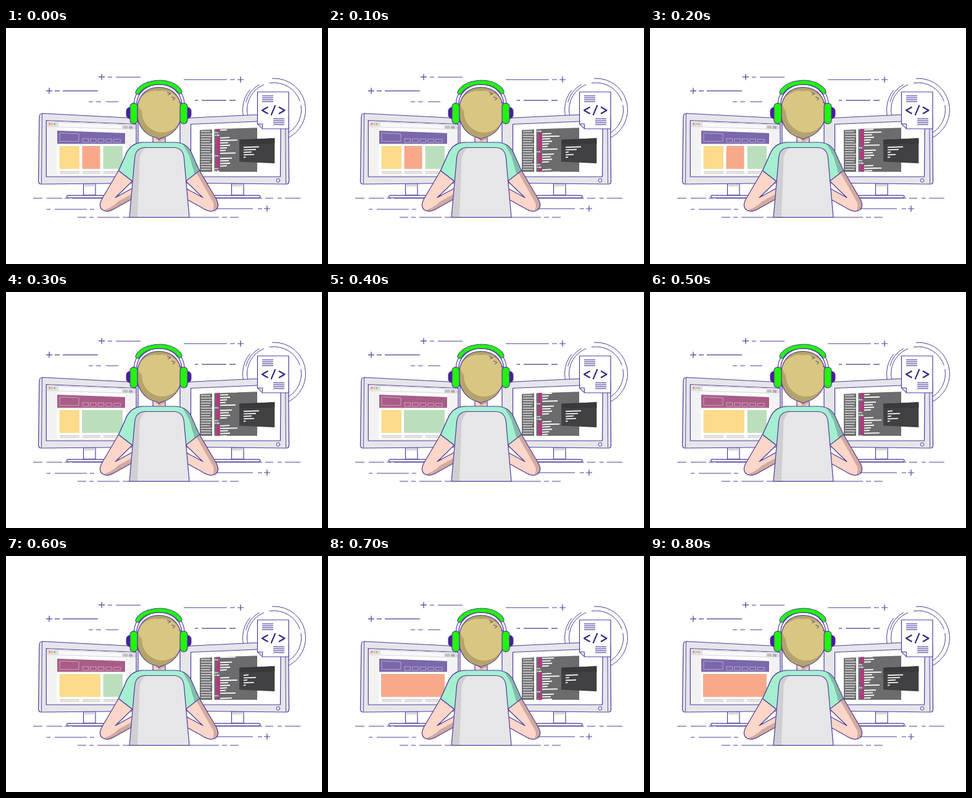
These frames come from a looping animation (512 px wide and 384 px high, 0.9 s). An HTML page with a canvas:

```html
<!DOCTYPE html>
<html lang="en">
<head>
<meta charset="utf-8">
<title>Developer at work</title>
<style>
html, body { margin: 0; width: 100%; height: 100%; overflow: hidden; background: #fff; }
canvas { display: block; width: 512px; height: 384px; }
</style>
</head>
<body>
<canvas id="stage"></canvas>
<script>
const canvas = document.getElementById('stage');
const ratio = window.devicePixelRatio || 1;
canvas.width = 512 * ratio;
canvas.height = 384 * ratio;
const ctx = canvas.getContext('2d');

const STEP = 100, STEPS = 9;
const INK = '#4d3a9c', SHELL = '#e6e6ea', SKIN = '#fcd6c8', SKIN_DARK = '#d0aaa0';
const GREEN = '#22f40b', PLUM = '#4a1c9a', PURPLE = '#7b67ab', MAGENTA = '#a85c88';
const YELLOW = '#fcdb8c', ORANGE = '#f7a98a', MINT = '#bbdfbd';

function shape(d, fill, stroke, width = 1.2) {
  const p = new Path2D(d);
  if (fill) { ctx.fillStyle = fill; ctx.fill(p); }
  if (stroke) { ctx.strokeStyle = stroke; ctx.lineWidth = width; ctx.stroke(p); }
}

function box(x, y, w, h, fill) {
  ctx.fillStyle = fill;
  ctx.fillRect(x, y, w, h);
}

function pill(x, y, w, h, r, fill, stroke, width = 1.2) {
  ctx.beginPath();
  ctx.roundRect(x, y, w, h, r);
  ctx.fillStyle = fill;
  ctx.fill();
  if (stroke) { ctx.strokeStyle = stroke; ctx.lineWidth = width; ctx.stroke(); }
}

function dot(x, y, r, fill, stroke) {
  ctx.beginPath();
  ctx.arc(x, y, r, 0, 7);
  if (fill) { ctx.fillStyle = fill; ctx.fill(); }
  if (stroke) { ctx.strokeStyle = stroke; ctx.lineWidth = 1; ctx.stroke(); }
}

function arc(x, y, r, from, to) {
  ctx.beginPath();
  ctx.arc(x, y, r, from * Math.PI / 180, to * Math.PI / 180);
  ctx.strokeStyle = INK;
  ctx.lineWidth = 1;
  ctx.stroke();
}

// Dashes on one row, given as pairs of x positions.
function dashes(y, ...xs) {
  let d = '';
  for (let i = 0; i < xs.length; i += 2) d += `M${xs[i]},${y}H${xs[i + 1]}`;
  shape(d, null, INK, 1.2);
}

function plus(x, y) {
  shape(`M${x - 5},${y}h10M${x},${y - 5}v10`, null, INK, 1.2);
}

function mirrored(draw) {
  ctx.save();
  ctx.translate(496, 0);
  ctx.scale(-1, 1);
  draw();
  ctx.restore();
}

function clipped(d, draw) {
  ctx.save();
  ctx.clip(new Path2D(d));
  draw();
  ctx.restore();
}

function backdrop() {
  plus(70, 102.3);
  dashes(102.3, 79, 87, 92, 149);
  plus(155, 79.7);
  dashes(80, 165, 172, 178, 218);
  dashes(120, 134, 141, 146, 154, 162, 182);
  dashes(84, 288, 358, 363, 371);
  plus(380, 84);
  dashes(117.6, 306, 311, 317, 357, 362, 372);
  dashes(277, 44, 59, 66, 91, 95, 102, 107, 185, 310, 415, 420, 433, 440, 447, 452, 477);
  dashes(295, 66, 72, 79, 131, 136, 143);
  dashes(294, 341, 400, 408, 415);
  plus(423, 294);
  dashes(308, 116, 130, 135, 142, 148, 184, 189, 345, 350, 358, 363, 377);
}

function badgeRings() {
  dot(434.5, 133, 44, '#fff');
  arc(434.5, 133, 51, -94, 78);
  arc(434.5, 133, 51, 150, 219);
  arc(434.5, 133, 44, -205, -112);
  arc(434.5, 133, 44, -100, -18);
  arc(434.5, 133, 44, -10, 62);
  arc(434.5, 133, 47.5, 195, 240);
}

function documentIcon() {
  shape('M407.5,104H458V164H416L407.5,156Z', '#fff', INK);
  shape('M407.5,156H415.5V164Z', '#e4e1f0', INK, 1);
  for (let i = 0; i < 4; i++) {
    dashes(110.5 + i * 3.1, 415, 433);
    dashes(147.8 + i * 3.1, 433, 451);
  }
  shape('M424.5,128.5L415,134L424.5,139.5M436.5,125.5L429.5,142M442,128.5L451.5,134L442,139.5',
    null, '#3a2580', 2.1);
}

function stand(x, baseX, baseW) {
  shape(`M${x},253h19.5v19h-19.5Z`, '#fff', INK);
  box(x + 1, 254, 18, 4, '#d9d8df');
  pill(baseX, 272.3, baseW, 4, 2, '#fff', INK);
}

function page(step) {
  const magenta = step > 2 && step < 7;
  shape('M66.5,151.5L210,157V241H66.5Z', '#f3f2f3');
  shape('M66.5,151.5L210,157V165.5L66.5,161Z', '#dfdfe2');
  shape('M85,154L188,158V163.5L85,160.5Z', '#f8f8f8');
  ['#ee6660', '#f2be4c', '#7bc96f'].forEach((c, i) => dot(71 + i * 4, 156 + i * .15, 1.5, c));
  box(190, 159.5, 7, 4, '#bdbcc0');
  box(199.5, 159.8, 5.5, 4, '#aaa9ae');
  shape('M82.5,162L194,166V239H82.5Z', '#fff');

  shape('M83,167L193,171V188.5H83Z', magenta ? MAGENTA : PURPLE);
  const line = magenta ? '#dba9c4' : '#bdb0d8';
  shape('M87,170.8L118,172V184.5H87Z', null, line, .9);
  for (let i = 0; i < 5; i++) {
    const x = 124 + i * 12.6;
    shape(`M${x},${180 + i * .25}h${i === 4 ? 11 : 9.5}V186h${i === 4 ? -11 : -9.5}Z`, null, line, .9);
  }

  const cards =
    step < 3 ? [[86.5, 32.5, YELLOW], [123.5, 29, ORANGE], [157.5, 31.5, MINT]] :
    step < 5 ? [[86.5, 32.5, YELLOW], [123, 66, MINT]] :
    step < 7 ? [[86.5, 66.5, YELLOW], [157.5, 31.5, MINT]] :
    [[86, 103, ORANGE]];
  for (const [x, w, fill] of cards) box(x, 192, w, 37.3, fill);
  for (const [x, w] of [[87, 32], [124, 29], [157.5, 31.5]]) {
    box(x, 233.5, w, 1, '#a9a8a8');
    box(x, 236.2, w, 1, '#b9b8b8');
  }
}

function leftMonitor(step) {
  stand(125.5, 98.5, 92);
  shape('M59,139L214,147V252.5L57,254Q52.5,254 52.5,249L54,145Q54,139 59,139Z', SHELL, INK);
  shape('M58.5,140L57.5,253', null, INK, .9);
  shape('M65.3,150.5L211,156.5V242H65.3Z', '#fff', INK);
  page(step);
}

// One cycle of code rows; negative widths mark short rows without a keyword.
const CODE = [15, 28, 13, 16, 11, 9, 25, -5, 19, 14, 16, 11, -5, -7];
const PITCH = 4.18;

function codeRows(step) {
  const cycle = PITCH * CODE.length;
  const offset = step / STEPS * cycle;
  for (let i = -CODE.length; i < 2 * CODE.length; i++) {
    const w = CODE[(i + CODE.length) % CODE.length];
    const y = 177 + i * PITCH - offset;
    if (y < 158 || y > 236) continue;
    if (w < 0) {
      box(338.5, y + .8, 2, 1.7, '#fff');
      box(341.5, y + .8, -w - 3, 1.7, '#fff');
    } else {
      box(341, y, 5.3, 3.5, '#c82a86');
      shape(`M347,${y + .9}l${w},-.6v1.8l${-w},.6Z`, '#fff');
    }
  }
}

const TYPED = [
  [25, 20, 13, 17, 3.5],
  [25, 18, 5, 13, 4],
  [8, 20, 6, 17, 3.5],
  [20, 6, 17, 3.5]
];
const TYPED_ORDER = [0, 1, 1, 0, 0, 2, 2, 3, 0];

function terminal(step) {
  shape('M378,181.8L435.3,179.3V220.3L378,217.5Z', '#414143');
  shape('M378,181.8L435.3,179.3V188L378,189.3Z', '#39393b');
  TYPED[TYPED_ORDER[step]].forEach((w, i) => {
    const y = 193.3 + i * 4.1;
    shape(`M385,${y}l${w},-.7v1.7l${-w},.7Z`, '#fff');
  });
}

function rightMonitor(step) {
  stand(365.5, 336.5, 75.5);
  shape('M282,147L453,139Q457.5,139 457.7,144L458.5,250Q458.5,254 454,254L282,252Z', SHELL, INK);
  shape('M452.7,140L453.5,253', null, INK, .9);
  shape('M299.5,156.5L445.3,150.5L444.5,242H299.5Z', '#fff', INK);
  dot(441, 248, 2.8, '#fff', INK);
  shape('M314,166L334,165.2V234H314Z', '#6c6c6e');
  for (let i = 0; i < 16; i++) {
    const w = 15 + i * 7 % 4;
    shape(`M315.8,${168.5 + i * 4.1}h${w}`, null, '#d6d6d8', 1.6);
  }
  const panel = 'M337.5,164.5L407,162.3V234H337.5Z';
  shape(panel, '#6c6c6e');
  clipped(panel, () => codeRows(step));
  terminal(step);
}

const ARM = 'M183,231L155,279Q149,291 157,296.5Q164,300.5 174,295L208,276V259L177,276L206,248Z';
const SLEEVE = 'M222,186Q204,187 196,202L182.5,232L205,249.5L214,230Z';

function person() {
  shape(ARM, SKIN);
  clipped(ARM, () => shape('M153,298Q170,294 182,282L208,268V300Z', SKIN_DARK));
  shape(ARM, null, INK);
  mirrored(() => {
    shape(ARM, SKIN);
    clipped(ARM, () => shape('M178,231L188,235L162,281Q156,289 163,300H145V270Z', SKIN_DARK));
    shape(ARM, null, INK);
  });

  shape('M238,172V188H258V172Z', SKIN, INK);
  shape('M238.6,174H257.4V181L248,185Z', SKIN_DARK);
  const shirt = 'M222,186H274Q293,187 300,202L313.5,232L291,249.5L284,230H212L205,249.5L182.5,232L196,202Q203,187 222,186Z';
  shape(shirt, '#a5efd1');
  clipped(shirt, () => shape('M286,188Q298,192 303,205L316,233L306,239L297,208Z', '#83bba7'));
  shape(shirt, null, INK);
  shape(SLEEVE, '#a5efd1');
  shape('M222,186Q204,187 196,202L182.5,232L205,249.5', null, INK);

  const chair = 'M200,308L208.5,212Q210,194.5 226,194.5H271Q287,194.5 288.5,212L297,308Z';
  shape(chair, '#e6e6e9');
  clipped(chair, () => shape('M198,308L206,190H238Q218,195 216.5,214L213,308Z', '#cfcfd2'));
  shape(chair, null, INK);
}

function head() {
  // Thin band behind the hair
  const band = 'M209.5,128C207,77 289,77 287,128';
  shape(band, null, INK, 5.5);
  shape(band, null, '#fff', 3.2);
  pill(195, 129, 12, 18.5, 7, PLUM, INK, 1);
  pill(288, 129, 12, 18.5, 7, PLUM, INK, 1);

  const skull = 'M248,96.5C272,96.5 284.5,114 284.5,137C284.5,159 270,174 255,178Q250,179 248,181.5Q246,179 241,178C226,174 212,159 212,137C212,114 224,96.5 248,96.5Z';
  shape(skull, '#b5a36d');
  clipped(skull, () => {
    ctx.beginPath();
    ctx.ellipse(253, 136, 33, 34, 0, 0, 7);
    ctx.fillStyle = '#d8c682';
    ctx.fill();
    shape('M213,123Q219,106 240,102L262,104L252,109Q226,111 219,135Z', '#d8c682');
  });
  shape(skull, null, INK);
  shape('M261,104.5L267,107L262.5,109M268,112L274,114.5L270,117.5M280,121L285,122', null, INK, 1);

  const top = 'M213.5,104.5C224,84 271,83 281.5,103.5';
  ctx.lineCap = 'round';
  shape(top, null, INK, 8);
  shape(top, null, GREEN, 6);
  ctx.lineCap = 'butt';
  pill(201, 122.3, 12, 33.5, 5.5, GREEN, INK);
  pill(282, 122.3, 12, 33.5, 5.5, GREEN, INK);
}

function draw(now) {
  const step = Math.floor(now / STEP) % STEPS;
  ctx.setTransform(ratio, 0, 0, ratio, 0, 0);
  box(0, 0, 512, 384, '#fff');
  ctx.lineJoin = 'round';
  backdrop();
  badgeRings();
  leftMonitor(step);
  rightMonitor(step);
  documentIcon();
  person();
  head();
}

const start = performance.now();
function tick() {
  draw(performance.now() - start);
  requestAnimationFrame(tick);
}
tick();
</script>
</body>
</html>
```
